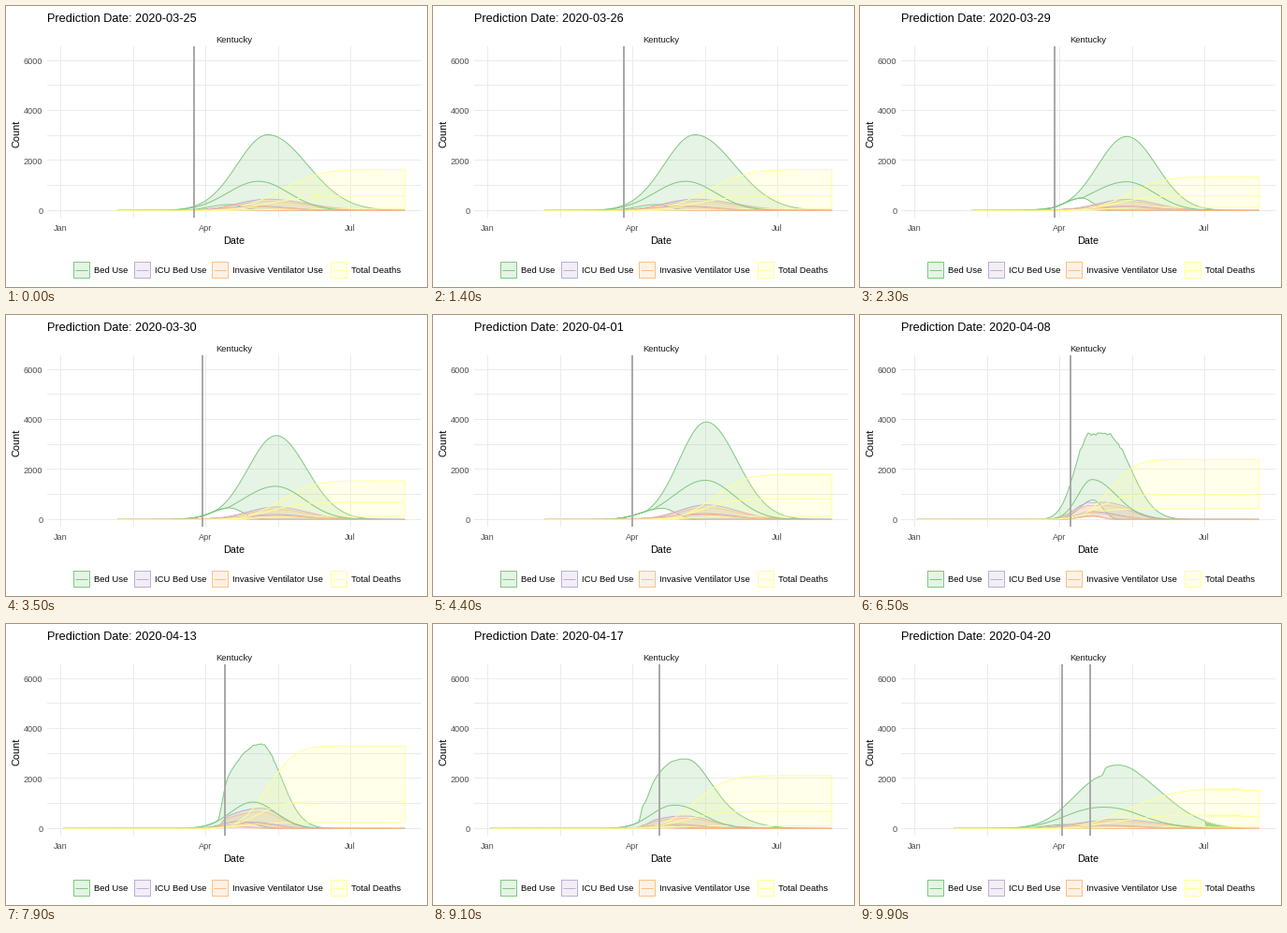
Animation of 450x300 px, one loop 10 s. Source, as a matplotlib script:

```python
import math
import numpy as np
import matplotlib.pyplot as plt
from matplotlib.animation import FuncAnimation
from matplotlib.patches import Polygon, Rectangle

FONT = "Liberation Sans"
COLORS = ["#7FC97F", "#BEAED4", "#FDC086", "#FFFF99"]
LABELS = ["Bed Use", "ICU Bed Use", "Invasive Ventilator Use", "Total Deaths"]
LEFT, RIGHT, TOP, BOTTOM = 44, 444, 43, 226
LAST_DAY = 216
DATES = ["03-25", "03-26", "03-27", "03-29", "03-30", "03-31", "04-01",
         "04-05", "04-07", "04-08", "04-10", "04-13", "04-17", "04-20"]
FRAMES, INTERVAL = 100, 100


def px(day):
    return 58.2 + 1.7033 * day


def py(value):
    return 218.4 - value * 0.02672


def day_number(date):
    month, day = map(int, date.split("-"))
    return {3: 60, 4: 91}[month] + day - 1


def arrival(i):
    """Frame at which forecast i is fully shown."""
    return max(0, min(7 * i + 2, 9 * i - 3))


erf = np.vectorize(math.erf)


def step(x, center, spread):
    return 0.5 * (1 + erf((x - center) / spread / math.sqrt(2)))


def bump(x, peak, center, left, right, flat=0):
    """Two-sided bell, optionally with a flat top of half-width flat."""
    away = np.maximum(np.abs(x - center) - flat, 0)
    return peak * np.exp(-0.5 * (away / np.where(x < center, left, right)) ** 2)


def roughen(v, amount, seed):
    noise = np.random.default_rng(seed).uniform(-amount, amount, len(v))
    return v + noise * (v > 0.75 * v.max())


def forecast(first, upper, mean, lower, icu, deaths, center, spread):
    """Rows of one forecast: days and values[series, (low, mid, high), row]."""
    days = np.arange(first, LAST_DAY + 1)
    x = px(days)
    low = bump(x, *lower)
    mid = np.maximum(bump(x, *mean), low)
    high = np.maximum(upper(x), mid)
    beds = np.array([low, mid, high])
    dead = np.array([total * step(x, center - 12 * lag, spread)
                     for total, lag in zip(deaths, (2, 1, 0))])
    return days, np.array([beds, beds * icu, beds * icu * 0.82, dead])


def mix(a, b, t):
    return a[0], a[1] + (b[1] - a[1]) * t


def build():
    mar25 = forecast(36, lambda x: bump(x, 3030, 280, 33, 42),
                     (1170, 270, 33, 32), (240, 238, 20, 15),
                     0.15, (60, 590, 1640), 294, 33)
    mar29 = forecast(36, lambda x: bump(x, 2960, 285, 31, 32),
                     (1150, 285, 37, 30), (500, 237, 18, 12),
                     0.15, (130, 590, 1340), 287, 28)
    apr01 = forecast(36, lambda x: bump(x, 3900, 292, 29, 33),
                     (1570, 291, 34, 31), (450, 245, 22, 14),
                     0.15, (130, 820, 1800), 300, 26)
    apr05 = forecast(36, lambda x: roughen(np.maximum(
                         bump(x, 4800, 240, 12, 14),
                         bump(x, 5230, 272, 18, 20, flat=11)), 90, 5),
                     (2600, 248, 18, 32), (1620, 249, 14, 12),
                     0.195, (870, 1740, 3390), 268, 24)
    apr08 = forecast(2, lambda x: roughen(
                         bump(x, 3420, 255, 16, 25, flat=9), 70, 8),
                     (1600, 248, 15, 26), (780, 249, 14, 10),
                     0.2, (430, 1000, 2400), 267, 22)
    apr13 = forecast(2, lambda x: roughen(
                         bump(x, 3380, 272, 36, 22) * step(x, 230, 4), 35, 13),
                     (1060, 264, 24, 24), (290, 250, 18, 16),
                     0.24, (240, 1080, 3300), 280, 23)
    apr20 = forecast(2, lambda x: bump(x, 2500, 262, 29, 40, flat=4)
                     * step(x, 221.5, 1.5),
                     (900, 253, 22, 33), (100, 245, 16, 14),
                     0.14, (50, 480, 1530), 280, 32)
    return [mar25, mar25, mar25, mar29, mix(mar29, apr01, 1 / 3),
            mix(mar29, apr01, 2 / 3), apr01, apr05, apr05, apr08,
            mix(apr08, apr13, 0.5), apr13, mix(apr13, apr20, 0.5), apr20]


STATES = build()
MARKS = [px(day_number(d)) for d in DATES]


def tween(a, b, t):
    """Match rows by index; surplus old rows stay put until the end."""
    n = min(len(a[0]), len(b[0]))
    days = np.append(a[0][:n] + (b[0][:n] - a[0][:n]) * t, a[0][n:])
    moved = a[1][..., :n] + (b[1][..., :n] - a[1][..., :n]) * t
    values = np.concatenate([moved, a[1][..., n:]], axis=2)
    order = np.argsort(days, kind="stable")
    return days[order], values[..., order]


fig = plt.figure(figsize=(4.5, 3), dpi=100, facecolor="white")
ax = fig.add_axes([0, 0, 1, 1])
ax.set_xlim(0, 450)
ax.set_ylim(300, 0)
ax.axis("off")


def text(x, y, s, size, color="black", **kw):
    return ax.text(x, y, s, fontsize=size * 0.72, color=color,
                   family=FONT, **kw)


def stroke(xs, ys, color, z):
    return ax.plot(xs, ys, color=color, lw=0.72, zorder=z,
                   solid_capstyle="butt")[0]


def box(x, y, w, h, color, z, **kw):
    return ax.add_patch(Rectangle((x, y), w, h, fc=color, lw=0,
                                  antialiased=False, zorder=z, **kw))


# grid and axis labels
for day in (0, 45.5, 91, 136.5, 182):
    box(round(px(day)), TOP, 1, BOTTOM - TOP, "#EBEBEB", 1)
for v in range(0, 7000, 1000):
    box(LEFT, int(py(v)), RIGHT - LEFT, 1, "#EBEBEB", 1)
    if v % 2000 == 0:
        text(39.3, py(v) + 3.8, str(v), 9.1, "#4D4D4D", ha="right")
for day, name in ((0, "Jan"), (91, "Apr"), (182, "Jul")):
    text(px(day), 240.5, name, 9.2, "#4D4D4D", ha="center")
text(244, 39, "Kentucky", 9.45, "#1A1A1A", ha="center")
text(244, 254, "Date", 10.8, ha="center")
text(11.5, 136.5, "Count", 11, ha="center", va="center", rotation=90)
title = text(43.8, 17, "", 12.8)

# legend
for x, label, color in zip((94, 159, 242, 369), LABELS, COLORS):
    k = x - 22.5
    box(k, 272.5, 17, 17, color, 2, alpha=0.2)
    stroke([k, k + 17, k + 17, k, k],
           [272.5, 272.5, 289.5, 289.5, 272.5], color, 3)
    stroke([k + 2, k + 15], [281.5, 281.5], color, 3)
    text(x, 285, label, 9.45)

# bands, curves and date markers
bands, edges, curves = [], [], []
for i, color in enumerate(COLORS):
    corner = [[0, 0], [1, 0], [1, 1]]
    bands.append(ax.add_patch(Polygon(corner, fc=color, lw=0, alpha=0.2,
                                      zorder=4 + i * 0.1)))
    edges.append(stroke([], [], color, 4.05 + i * 0.1))
    curves.append(stroke([], [], color, 5 + i * 0.1))
marker = box(0, TOP, 2, BOTTOM - TOP, "#A9A9A9", 6)
leftover = box(0, TOP, 2, BOTTOM - TOP, "#A9A9A9", 6)


def place(bar, x):
    bar.set_x(round(x) - 1)


def draw(frame):
    now = max(i for i in range(len(DATES)) if arrival(i) <= frame)
    nxt = (now + 1) % len(DATES)
    steps = 4 if nxt == 3 else 3
    t = max(0, frame - (arrival(now + 1) - steps)) / steps
    a, b = STATES[now], STATES[nxt]
    days, values = tween(a, b, t) if t else a

    x = px(days)
    loop_x = np.concatenate([x, x[::-1], x[:1]])
    for i, (low, mid, high) in enumerate(py(values)):
        loop_y = np.concatenate([high, low[::-1], high[:1]])
        bands[i].set_xy(np.column_stack([loop_x, loop_y]))
        edges[i].set_data(loop_x, loop_y)
        curves[i].set_data(x, mid)

    place(marker, MARKS[now] + (MARKS[nxt] - MARKS[now]) * t)
    place(leftover, MARKS[now])
    leftover.set_visible(t > 0 and len(a[0]) > len(b[0]))
    title.set_text("Prediction Date: 2020-" + DATES[now])
    return []


anim = FuncAnimation(fig, draw, frames=FRAMES, interval=INTERVAL,
                     init_func=lambda: draw(0), repeat=True, repeat_delay=0)
plt.show()
```
